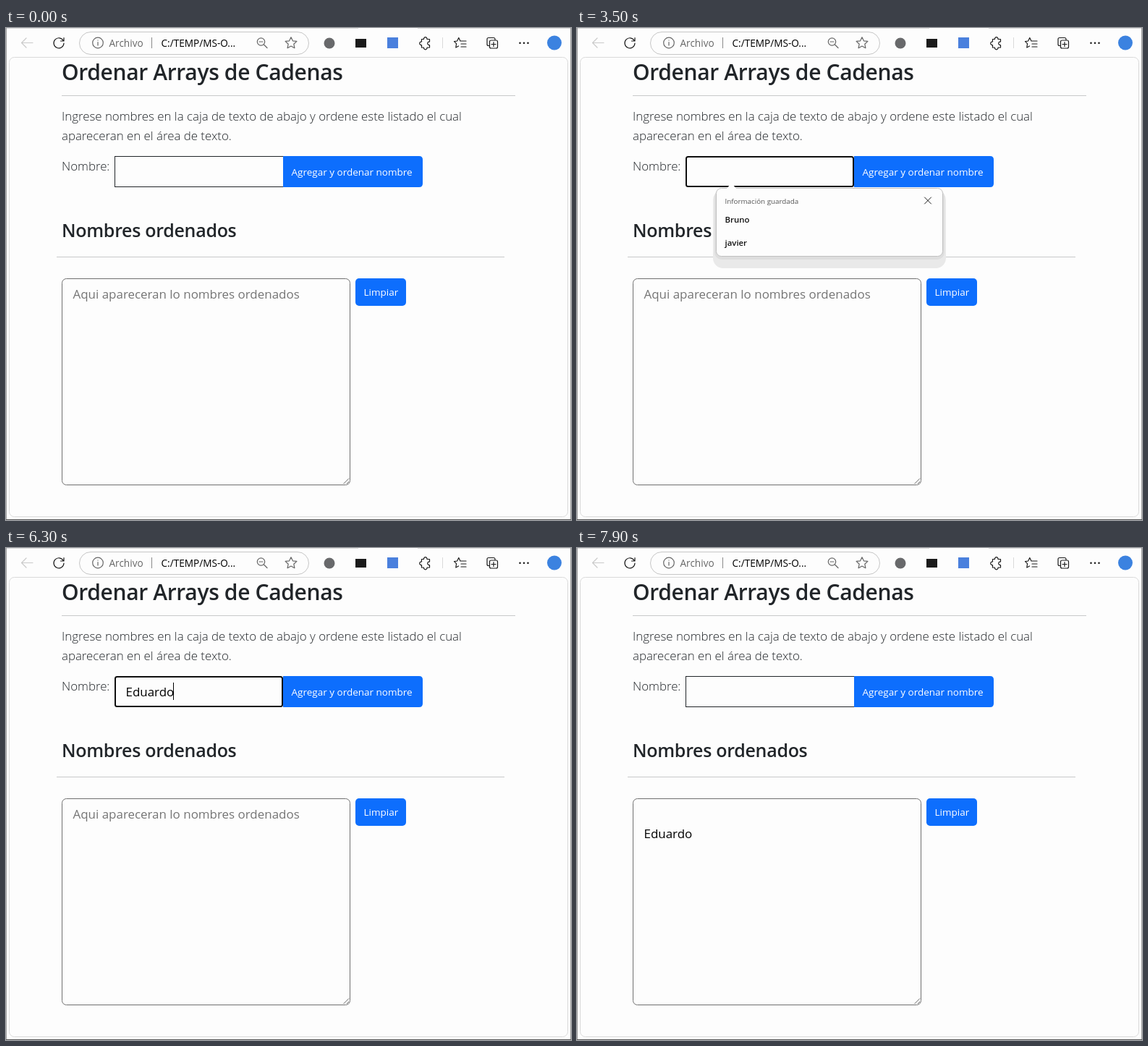
Animation, 781 px wide and 680 px high, one loop 8000 ms. Source, as an HTML page:

```html
<!DOCTYPE html>
<html lang="es">
<head>
<meta charset="utf-8">
<title>Ordenar Arrays de Cadenas</title>
<style>
html, body { margin: 0; width: 100%; height: 100%; overflow: hidden; background: #fdfdfd; }
svg { display: block; width: 781px; height: 680px; font-family: "Open Sans", "Noto Sans", sans-serif; }
.line { fill: none; stroke: #1b1b1b; stroke-width: 1.2; stroke-linecap: round; stroke-linejoin: round; }
.soft { stroke: #666; }
.dim { stroke: #cacaca; }
.title { font-size: 30px; font-weight: 600; letter-spacing: -.35px; fill: #212529; }
.sub { font-size: 25px; font-weight: 600; letter-spacing: -.3px; fill: #212529; }
.body { font-size: 16.85px; font-weight: 300; fill: #212529; }
.field { font-size: 16.95px; fill: #000; }
.btn { fill: #0d6efd; }
.btn-text { font-size: 13.5px; font-weight: 500; fill: #fff; }
.bar { font-size: 13.6px; fill: #000; }
.saved { font-size: 11.4px; font-weight: 600; fill: #111; }
</style>
</head>
<body>
<svg viewBox="0 0 781 680">
  <!-- window -->
  <rect width="781" height="680" fill="#fdfdfd"/>
  <path d="M0 .5H487M569 .5H781" stroke="#dcdcdc"/>
  <path d="M.5 0V680M780.5 0V680" stroke="#a2a2a2"/>
  <path d="M0 679.5H781" stroke="#555"/>
  <rect x="4.5" y="40.5" width="772" height="635" rx="7" fill="#fdfdfd" stroke="#dadada"/>

  <!-- toolbar -->
  <path class="line dim" d="M37 20.5H21.5M28 14L21.500 20.5L28 27"/>
  <path class="line" d="M79.2 17.5A7 7 0 1 0 80 21M80 13.5V18H75.5"/>
  <rect x="101.5" y="5.5" width="317" height="31" rx="15.5" fill="#fdfdfd" stroke="#c6c6c6"/>
  <circle class="line soft" cx="127" cy="20.5" r="7.3"/>
  <path class="line soft" d="M127 19.5V24M127 16.8V17"/>
  <text class="bar" x="142.5" y="26" style="fill:#666">Archivo</text>
  <path d="M201.5 13V28" stroke="#8a8a8a"/>
  <text class="bar" x="214.5" y="26">C:/TEMP/MS-O...</text>
  <g class="line soft">
    <circle cx="352.5" cy="19" r="5.2"/>
    <path d="M350 19H355M356.5 23L361 27.5"/>
    <path id="star"/>
  </g>
  <circle cx="447" cy="21" r="7.5" fill="#68696b"/>
  <rect x="483" y="15" width="15" height="12" fill="#1a1a1a"/>
  <rect x="527" y="13" width="15" height="15" fill="#4a80dd"/>
  <path class="line" d="M575 15.5H577.5A2.3 2.3 0 1 1 582 15.5H585.5V19A2.3 2.3 0 1 0 585.5 23.5V27H582A2.3 2.3 0 1 1 577.5 27H574.5V23.5A2.3 2.3 0 1 1 574.5 19V15.5Z"/>
  <path d="M603.5 13V28" stroke="#dadada"/>
  <path class="line" d="M628 18L625.8 13.5L623.6 18L619.5 18.6L622.6 21.7L621.8 27L625.5 25M628 18H636M629 22H636M629 26H636"/>
  <g class="line">
    <path d="M668 24.5H667Q665 24.5 665 22.5V15.5Q665 13.5 667 13.5H674Q676 13.5 676 15.5V16.5"/>
    <rect x="668.5" y="17" width="11" height="11" rx="2"/>
    <path d="M674 19.5V25.5M671 22.5H677"/>
  </g>
  <g fill="#1b1b1b">
    <circle cx="710.5" cy="20.8" r="1.3"/><circle cx="716" cy="20.8" r="1.3"/><circle cx="721.5" cy="20.8" r="1.3"/>
  </g>
  <circle cx="758" cy="20.5" r="10" fill="#3b82e0"/>

  <!-- page -->
  <text class="title" x="77" y="72">Ordenar Arrays de Cadenas</text>
  <path d="M77 93.5H704M70 316.5H689" stroke="#c8c9ca"/>
  <text class="body" x="77" y="128">Ingrese nombres en la caja de texto de abajo y ordene este listado el cual</text>
  <text class="body" x="77" y="155">apareceran en el área de texto.</text>
  <text class="body" x="77" y="197">Nombre:</text>
  <rect id="idle" x="150.5" y="177.5" width="233" height="42" fill="#fdfdfd" stroke="#212529"/>
  <path id="add" class="btn" d="M383 177H571Q576 177 576 182V215Q576 220 571 220H383Z"/>
  <text class="btn-text" x="394.5" y="204">Agregar y ordenar nombre</text>
  <rect id="focus" x="151" y="178" width="231" height="41" rx="2.5" fill="#fdfdfd" stroke="#101010" stroke-width="2"/>
  <text id="typed" class="field" x="165.5" y="205"></text>
  <rect id="caret" y="186" width="1" height="24"/>
  <text class="sub" x="77" y="289">Nombres ordenados</text>
  <rect x="77.5" y="346.5" width="398" height="285" rx="6" fill="#fdfdfd" stroke="#707070"/>
  <path d="M466.5 630L474 622.5M471 630L474 627" stroke="#666"/>
  <text id="hint" class="field" x="92.5" y="374" style="fill:#757575">Aqui apareceran lo nombres ordenados</text>
  <text id="sorted" class="field" x="92.5" y="401">Eduardo</text>
  <rect class="btn" x="483" y="346" width="70" height="38" rx="5"/>
  <text class="btn-text" x="494.5" y="370">Limpiar</text>

  <!-- saved entries -->
  <g id="popup">
    <rect x="188" y="224" width="322" height="108" rx="14" fill="#e9e9e9"/>
    <rect x="190" y="223" width="318" height="97" rx="10" fill="#dedede"/>
    <rect x="192.5" y="221.5" width="313" height="94" rx="7" fill="#fdfdfd" stroke="#c0c0c0"/>
    <path d="M206.5 222.5L211.5 216.5H215.5L220.5 222.5Z" fill="#fdfdfd"/>
    <text x="204.5" y="243" font-size="9.8" fill="#555">Información guardada</text>
    <path class="line" style="stroke-width:1" d="M480.5 234L489.5 243M489.5 234L480.5 243"/>
    <text class="saved" x="204.5" y="269">Bruno</text>
    <text class="saved" x="204.5" y="301">javier</text>
  </g>

  <!-- pointers, hot spot at 0,0 -->
  <g fill="#fff" stroke="#000" stroke-linejoin="round">
    <path id="arrow" d="M0 0V16.5L4 13L6.5 19L9.2 17.8L6.7 12H12Z"/>
    <path id="beam" fill="none" d="M-4 -8.5H-1L0 -7.5L1 -8.5H4M0 -7.5V7.5M-4 8.5H-1L0 7.5L1 8.5H4"/>
    <path id="hand" stroke-width="1.2" d="M-1.8 14V1.5Q-1.8 -.3 0 -.3T1.8 1.5V8Q3.6 6.5 4.8 8.8Q6.8 7.6 7.8 9.8Q10.3 9 10.3 12V16Q10.3 18.5 8.8 20.5V22.5H.5V20.8L-5.2 13.8Q-6 11.6 -4.3 11.2Q-3 11.2 -1.8 14M1.8 8V12.5M4.8 8.8V12.5M7.8 9.8V13"/>
  </g>
</svg>
<script>
const LOOP = 8000;
const $ = id => document.getElementById(id);

const texts = [[0, ''], [4100, 'E'], [4200, 'Ed'], [4400, 'Edu'], [5100, 'Ed'], [5500, 'Edu'],
  [5900, 'Edua'], [6100, 'Eduar'], [6200, 'Eduard'], [6300, 'Eduardo'], [7700, '']];
const blinks = [0, 900, 1400, 2000, 2500, 3000, 3500, 4000, 4900, 5300, 6800, 7300, 7700]
  .map((t, i) => [t, i % 2 === 1]);
const buttonColors = [[0, '#0d6efd'], [7200, '#0b5ed7'], [7600, '#0a58ca'], [7700, '#0b5ed7'], [7900, '#0d6efd']];
const pointers = [[0, ''], [700, ''], [7100, 'beam', 211, 212], [7200, 'hand', 404, 209],
  [7300, 'hand', 421, 205], [7400, 'hand', 423, 207], [7900, '']];

const at = (table, t) => table.findLast(row => row[0] <= t);
const show = (id, on) => $(id).setAttribute('visibility', on ? 'visible' : 'hidden');

function pointerAt(t) {
  if (t < 100 || t >= 700) return at(pointers, t);
  const k = Math.floor(t / 100 - 1) / 5;
  const ease = k * k * (3 - 2 * k);
  return [t, 'arrow', 560 - 290 * ease, 398 - 196 * ease];
}

function starPath(cx, cy, outer, inner) {
  const points = Array.from({ length: 10 }, (_, i) => {
    const angle = i * Math.PI / 5 - Math.PI / 2;
    const r = i % 2 ? inner : outer;
    return (cx + r * Math.cos(angle)).toFixed(1) + ' ' + (cy + r * Math.sin(angle)).toFixed(1);
  });
  return 'M' + points.join('L') + 'Z';
}

function render(t) {
  const focused = t >= 900 && t < 7700;
  show('idle', !focused);
  show('focus', focused);
  show('popup', t >= 1000 && t < 4100);
  show('hint', t < 7700);
  show('sorted', t >= 7700);

  const text = at(texts, t)[1];
  const typed = $('typed');
  if (typed.textContent !== text) typed.textContent = text;
  const width = text ? typed.getComputedTextLength() : 0;
  $('caret').setAttribute('x', Math.max(165, Math.round(164.5 + width)));
  show('caret', at(blinks, t)[1]);
  $('add').style.fill = at(buttonColors, t)[1];

  const [, kind, x, y] = pointerAt(t);
  for (const id of ['arrow', 'beam', 'hand']) show(id, id === kind);
  if (kind) $(kind).setAttribute('transform', `translate(${x} ${y})`);
}

$('star').setAttribute('d', starPath(394, 21, 8.3, 4));
const start = performance.now();
function tick() {
  render((performance.now() - start) % LOOP);
  requestAnimationFrame(tick);
}
tick();
</script>
</body>
</html>
```
